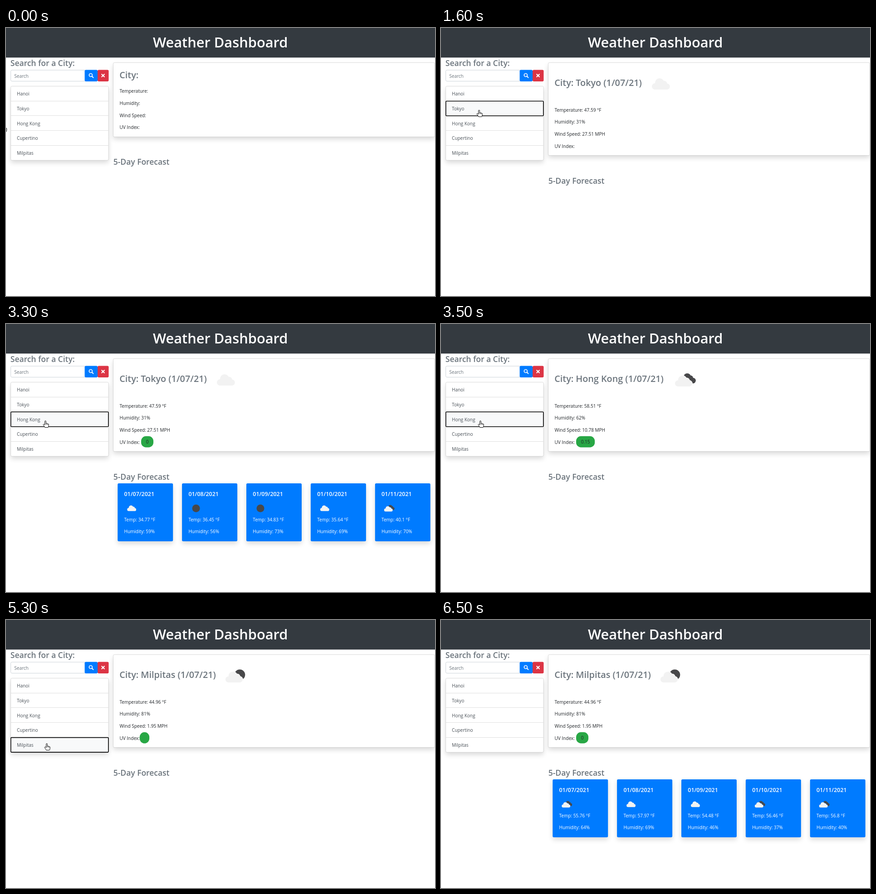
An HTML page with a canvas that plays this animation: 946 px wide and 592 px high, repeating every 6.56 s.

```html
<!DOCTYPE html>
<html lang="en">
<head>
<meta charset="utf-8">
<title>Weather Dashboard</title>
<style>
  html, body { margin: 0; width: 100%; height: 100%; overflow: hidden; background: #fff; }
  canvas { display: block; }
</style>
</head>
<body>
<canvas id="stage" width="946" height="592"></canvas>
<script>
const ctx = document.getElementById('stage').getContext('2d');
const LOOP = 6560;
const BLUE = '#007bff', GREY = '#6c757d', INK = '#212529';
const LIGHT = '#f2f2f2', DARK = '#48484a', HOVER = '#f8f9fa';
const EDGE = 'rgba(0,0,0,.125)';
const LIST = { x: 10, y: 128.5, w: 216, row: 32.7 };

const cities = ['Hanoi', 'Tokyo', 'Hong Kong', 'Cupertino', 'Milpitas'];

// Each report: when its header, UV badge and forecast arrive
const reports = [
  { at: 1600, uvAt: 1700, fullAt: 1730, city: 'Tokyo', temp: '47.59', hum: 31, wind: '27.51',
    uv: '0', icon: 'cloud', iconX: 485,
    days: ['34.77 59 cloud', '36.45 56 clear', '34.83 73 clear', '35.64 69 cloud', '40.1 70 broken'] },
  { at: 3430, uvAt: 3500, fullAt: 3530, city: 'Hong Kong', temp: '58.51', hum: 62, wind: '10.78',
    uv: '0.15', icon: 'broken', iconX: 538,
    days: ['50.97 58 broken', '48.43 46 broken', '54.21 43 clear', '50.2 48 broken', '52.38 42 broken'] },
  { at: 5300, uvAt: 5370, fullAt: 5370, city: 'Milpitas', temp: '44.96', hum: 81, wind: '1.95',
    uv: '0', icon: 'few', iconX: 506,
    days: ['55.76 64 broken', '57.97 69 cloud', '54.48 46 cloud', '56.46 37 broken', '56.8 40 broken'] }
];

const focusSteps = [[1270, 1], [3200, 2], [5030, 4], [6500, -1]];

const smooth = p => p * p * (3 - 2 * p);
const easeOut = p => 1 - (1 - p) ** 2;
const easeIn = p => p ** 1.4;

// Pointer moves: start, end, target x, target y, easing
const moves = [
  [0, 330, 89, 144.5, easeOut],
  [970, 1100, 84, 181.5, smooth],
  [2500, 2830, 87, 214, smooth],
  [3830, 4100, 91, 273.5, smooth],
  [4240, 4270, 90, 273, smooth],
  [5570, 6170, 41, 594, easeIn]
];

const hand = new Path2D('M-1.4 9V1.2a1.3 1.3 0 0 1 2.6 0V6a1.2 1.2 0 0 1 2.2 .2 ' +
  '1.2 1.2 0 0 1 2 .5 1.1 1.1 0 0 1 1.6 1V10.5q0 2-1.2 4H-1.2q-.6-1.6-3.4-5.2' +
  'a1.2 1.2 0 0 1 1.8-1.6z');

function makeCloud() {
  const p = new Path2D();
  for (const [x, y, r] of [[-13, 5, 7], [-3, -3, 10], [7, -1, 6.5], [13, 5.2, 6.8]]) {
    p.moveTo(x + r, y);
    p.arc(x, y, r, 0, Math.PI * 2);
  }
  p.rect(-13, 0, 26, 12);
  return p;
}
const cloud = makeCloud();

function text(s, x, y, size = 10, color = INK, weight = 400) {
  ctx.font = `${weight} ${size}px "Open Sans", "Noto Sans", sans-serif`;
  ctx.fillStyle = color;
  ctx.fillText(s, x, y);
}

function box(x, y, w, h, r, fill, { stroke, shadow } = {}) {
  ctx.save();
  ctx.beginPath();
  ctx.roundRect(x, y, w, h, r);
  if (shadow) {
    ctx.shadowColor = 'rgba(0,0,0,.15)';
    ctx.shadowBlur = 10.67;
    ctx.shadowOffsetY = 5.33;
  }
  ctx.fillStyle = fill;
  ctx.fill();
  ctx.restore();
  if (stroke) {
    ctx.strokeStyle = stroke;
    ctx.lineWidth = 1;
    ctx.stroke();
  }
}

function line(color, width, ...pts) {
  ctx.strokeStyle = color;
  ctx.lineWidth = width;
  ctx.beginPath();
  for (let i = 0; i < pts.length; i += 4) {
    ctx.moveTo(pts[i], pts[i + 1]);
    ctx.lineTo(pts[i + 2], pts[i + 3]);
  }
  ctx.stroke();
}

function disc(x, y, r, color) {
  ctx.fillStyle = color;
  ctx.beginPath();
  ctx.arc(x, y, r, 0, Math.PI * 2);
  ctx.fill();
}

function weatherIcon(kind, x, y, scale, back) {
  ctx.save();
  ctx.translate(x, y);
  ctx.scale(scale, scale);
  if (kind === 'clear') {
    disc(0, 0, 17, DARK);
  } else {
    if (kind === 'broken') {
      disc(5, -7, 8, DARK);
      disc(12, -4.5, 6, DARK);
      disc(17.5, 1, 6.3, DARK);
    }
    if (kind === 'few') disc(9.5, -3, 11.8, DARK);
    if (kind !== 'cloud') {
      ctx.translate(-3, 2.5);
      ctx.scale(.95, .95);
      ctx.strokeStyle = back;
      ctx.lineWidth = 2;
      ctx.stroke(cloud);
    }
    ctx.fillStyle = LIGHT;
    ctx.fill(cloud);
  }
  ctx.restore();
}

function pointerAt(t) {
  let x = -6, y = 215;
  for (const [from, to, tx, ty, ease] of moves) {
    if (t <= from) break;
    const p = ease(Math.min(1, (t - from) / (to - from)));
    x += (tx - x) * p;
    y += (ty - y) * p;
  }
  return { x, y };
}

function drawHeader() {
  ctx.fillStyle = '#343a40';
  ctx.fillRect(0, 0, 946, 65.3);
  ctx.textAlign = 'center';
  text('Weather Dashboard', 472.7, 43, 30.8, '#fff', 600);
  ctx.textAlign = 'left';
}

function drawSearch() {
  text('Search for a City:', 9.8, 84, 17.45, GREY, 600);
  box(10.5, 93, 166, 24.5, 2.67, '#fff', { stroke: '#ced4da' });
  text('Search', 18.3, 109.7, 10, GREY);
  box(173.5, 92.6, 28.5, 25.3, 2.67, BLUE);
  box(202, 92.6, 24.4, 25.3, 2.67, '#dc3545');
  ctx.strokeStyle = '#fff';
  ctx.lineWidth = 1.7;
  ctx.beginPath();
  ctx.arc(186.8, 104, 3.5, 0, Math.PI * 2);
  ctx.stroke();
  ctx.lineCap = 'round';
  line('#fff', 2, 189.6, 106.8, 192.4, 109.6);
  line('#fff', 2.2, 211.2, 102.2, 216.8, 107.8, 216.8, 102.2, 211.2, 107.8);
  ctx.lineCap = 'butt';
}

function drawList(focus, hover) {
  const { x, y, w, row } = LIST;
  box(x + .5, y + .2, w - .5, row * 5, 2.67, '#fff', { stroke: EDGE, shadow: true });
  cities.forEach((name, i) => {
    const top = y + i * row;
    if (i === focus || i === hover) {
      ctx.fillStyle = HOVER;
      ctx.fillRect(x + 1, top + .5, w - 1.5, row - .5);
    }
    if (i) {
      const edge = Math.floor(top) + .5;
      line(EDGE, 1, x + 1, edge, x + w - .5, edge);
    }
    text(name, x + 14, top + 20.6, 10, '#495057');
  });
  if (focus >= 0) {
    ctx.strokeStyle = '#000';
    ctx.lineWidth = 1.6;
    ctx.beginPath();
    ctx.roundRect(x + .7, y + focus * row + .3, w - .9, row - .2, 1.5);
    ctx.stroke();
  }
}

function drawBadge(value) {
  ctx.font = '400 10px "Open Sans", "Noto Sans", sans-serif';
  const w = 21.33 + ctx.measureText(value).width;
  const x = value ? 298 : 294.8;
  box(x, 247.8, w, 24.7, 10.67, '#28a745');
  text(value, x + 10.67, 264);
}

function drawCurrent(r, t) {
  box(236.5, 76.5, 709, r ? 205 : 164, 2.67, '#fff', { stroke: EDGE, shadow: true });
  const title = r ? `City: ${r.city} (1/07/21)` : 'City:';
  text(title, 250.3, r ? 128.4 : 111, 19.8, GREY, 600);
  const rows = [
    'Temperature:' + (r ? ` ${r.temp} °F` : ''),
    'Humidity:' + (r ? ` ${r.hum}%` : ''),
    'Wind Speed:' + (r ? ` ${r.wind} MPH` : ''),
    'UV Index:'
  ];
  rows.forEach((s, i) => text(s, 250.5, (r ? 184.6 : 143.2) + i * 26.65));
  if (!r) return;
  weatherIcon(r.icon, r.iconX, 124, 1, '#fff');
  if (t >= r.uvAt) drawBadge(r.uv);
  else if (r !== reports[0]) drawBadge('');
}

function drawForecast(r, t) {
  text('5-Day Forecast', 236.8, r ? 343.5 : 302.3, 17.45, GREY, 600);
  if (!r || t < r.fullAt) return;
  r.days.forEach((day, i) => {
    const [temp, hum, icon] = day.split(' ');
    const x = 246.2 + i * 141.9, left = x + 14.3;
    box(x, 352, 122, 128, 2.67, BLUE, { shadow: true });
    text(`01/${String(7 + i).padStart(2, '0')}/2021`, left, 379.5, 12.45, '#fff', 600);
    weatherIcon(icon, x + 31, 407.3, .5, BLUE);
    text(`Temp: ${temp} °F`, left, 435.6, 10, '#fff');
    text(`Humidity: ${hum}%`, left, 462.2, 10, '#fff');
  });
}

function drawPointer({ x, y }) {
  ctx.save();
  ctx.translate(x, y);
  ctx.fillStyle = '#fff';
  ctx.fill(hand);
  ctx.strokeStyle = '#000';
  ctx.lineWidth = 1;
  ctx.lineJoin = 'round';
  ctx.stroke(hand);
  line('#000', .8, 1.2, 6, 1.2, 8.5, 3.4, 6.4, 3.4, 8.5, 5.3, 7, 5.3, 8.5);
  ctx.restore();
}

function draw(now) {
  const t = now % LOOP;
  const pointer = pointerAt(t);
  const report = reports.findLast(r => t >= r.at);
  const focus = (focusSteps.findLast(s => t >= s[0]) || [0, -1])[1];
  const hover = t < 1270 ? -1 : Math.floor((pointer.y - LIST.y) / LIST.row);

  ctx.fillStyle = '#fff';
  ctx.fillRect(0, 0, 946, 592);
  drawCurrent(report, t);
  drawForecast(report, t);
  drawList(focus, hover);
  drawSearch();
  drawHeader();
  drawPointer(pointer);
}

const start = performance.now();
function tick() {
  draw(performance.now() - start);
  requestAnimationFrame(tick);
}
tick();
</script>
</body>
</html>
```
